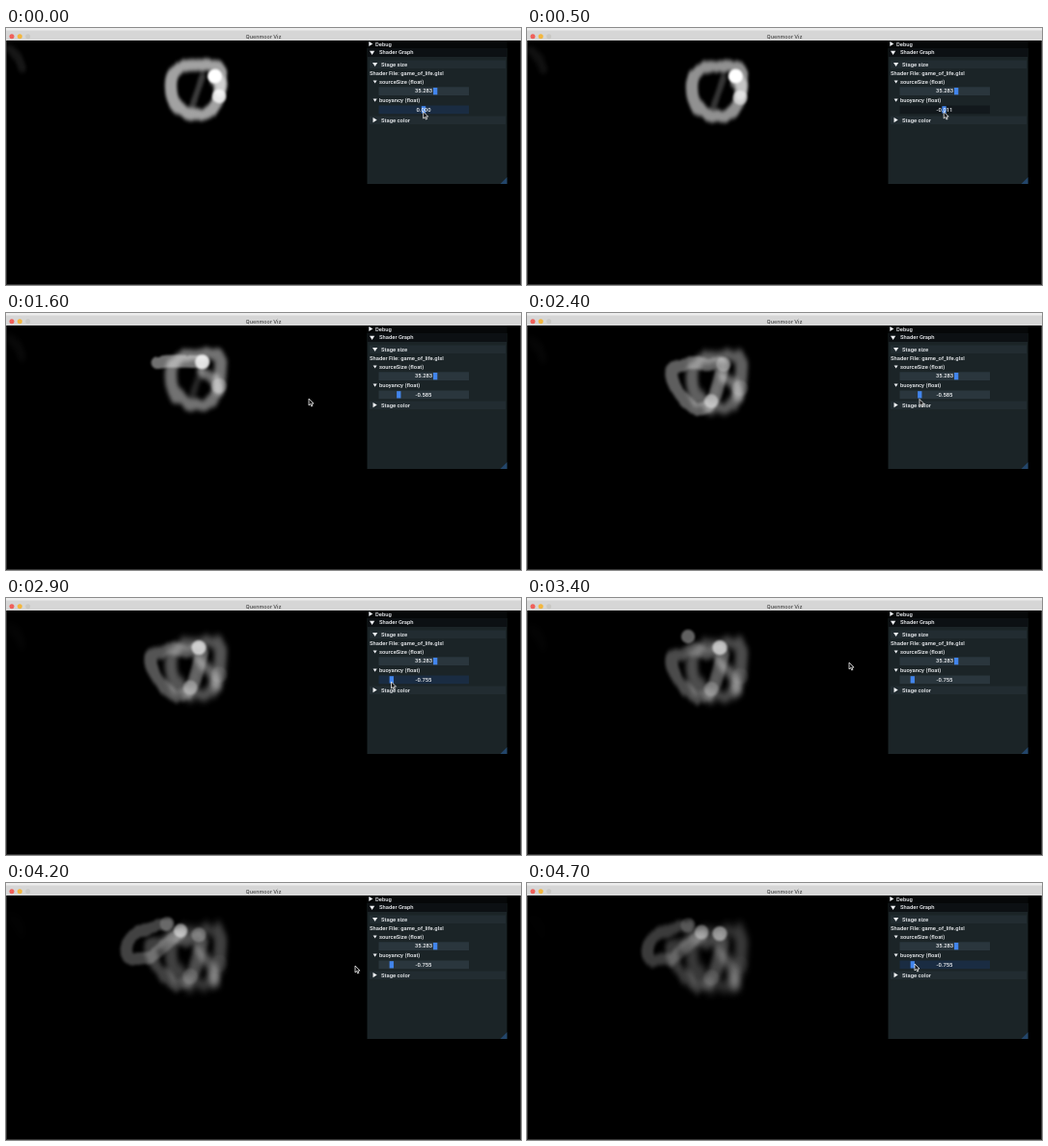
Animation, 534 px wide and 267 px high, one loop 4800 ms. Source, as an HTML page:

```html
<!DOCTYPE html>
<html lang="en">
<head>
<meta charset="utf-8">
<title>Smoke simulation</title>
<style>
  html, body { margin: 0; width: 100%; height: 100%; overflow: hidden; background: #000; }
  svg { display: block; width: 100vw; height: 100vh; }
  text { font: 500 5.85px Roboto, sans-serif; fill: #eef0f3; }
  .title { font: 500 5.4px Inter, sans-serif; fill: #444; }
  .mid { text-anchor: middle; }
</style>
</head>
<body>
<svg id="stage" viewBox="0 0 534 267">
  <rect width="534" height="267"/>
  <g id="smoke" fill="none" stroke-linecap="round" stroke-linejoin="round"></g>

  <path d="M.4 13V266.6H533.6V13" fill="none" stroke="#555" stroke-width=".7"/>
  <rect width="534" height="13" fill="#d6d6d6"/>
  <rect width="534" height="2.5" fill="#ededed"/>
  <circle cx="6" cy="8.8" r="2.5" fill="#f0605a"/>
  <circle cx="14.3" cy="8.8" r="2.5" fill="#f3b73e"/>
  <circle cx="22.7" cy="8.8" r="2.5" fill="#c9c8c4"/>
  <text class="title mid" x="267" y="10.8">Quenmoor Viz</text>

  <rect x="374.5" y="13" width="145" height="8" fill="#060809"/>
  <rect x="374.5" y="21" width="145" height="141" fill="#1b2427"/>
  <rect x="374.5" y="21" width="145" height="9" fill="#0c1013"/>
  <rect x="377" y="33.5" width="141" height="8.5" fill="#222c31"/>
  <rect x="377" y="91.5" width="141" height="8.5" fill="#222c31"/>
  <rect x="386.5" y="61.3" width="93.5" height="8.7" fill="#2a363d"/>
  <rect id="field" x="386.5" y="80.5" width="93.5" height="8.7"/>
  <rect x="443" y="62" width="4.3" height="7.3" fill="#4285ec"/>
  <rect id="grab" y="81.2" width="4.3" height="7.3" fill="#4285ec"/>
  <path d="M519.5 155V162H512.5Z" fill="#23466b"/>
  <g id="arrows" fill="#eef0f3"></g>
  <text x="383" y="18.5">Debug</text>
  <text x="387" y="27.4">Shader Graph</text>
  <text x="389" y="40">Stage size</text>
  <text x="377" y="49.4">Shader File: game_of_life.glsl</text>
  <text x="387" y="57.8">sourceSize (float)</text>
  <text class="mid" x="433" y="67.4">35.283</text>
  <text x="387" y="77">buoyancy (float)</text>
  <text id="value" class="mid" x="433" y="86.7"></text>
  <text x="389" y="97.9">Stage color</text>
  <path id="cursor" d="M0 0V7L1.6 5.5L2.7 8L3.9 7.5L2.8 5.1H5Z" fill="#111" stroke="#fff" stroke-width=".75"/>
</svg>
<script>
const LOOP = 4800, STEP = 100;
const NS = 'http://www.w3.org/2000/svg';
const byId = id => document.getElementById(id);
const set = (el, attrs) => { for (const k in attrs) el.setAttribute(k, attrs[k]); };
const ramp = (t, from, to) => Math.min(1, Math.max(0, (t - from) / (to - from)));

function add(parent, tag, attrs) {
  const el = document.createElementNS(NS, tag);
  set(el, attrs);
  return parent.appendChild(el);
}

function arrow(x, y, size, open) {
  const d = open ? 'M-1 -.8H1L0 .8Z' : 'M-.8 -1V1L.8 0Z';
  add(byId('arrows'), 'path', { d, transform: `translate(${x} ${y}) scale(${size})` });
}
arrow(378.3, 16.5, 2.5);
arrow(379.6, 25.8, 2.6, true);
arrow(382.6, 38, 2.6, true);
arrow(382.6, 56, 2, true);
arrow(382.6, 75.1, 2, true);
arrow(382.6, 95.6, 2.6);

// Catmull-Rom spline through evenly timed points.
function spline(points, u) {
  const s = u * (points.length - 1);
  const i = Math.min(Math.floor(s), points.length - 2), f = s - i;
  const p = k => points[Math.min(points.length - 1, Math.max(0, k))];
  return [0, 1].map(c => {
    const [a, b, d, e] = [i - 1, i, i + 1, i + 2].map(k => p(k)[c]);
    return b + f / 2 * (d - a + f * (2 * a - 5 * b + 4 * d - e + f * (3 * (b - d) + e - a)));
  });
}

// The slider is dragged twice; between drags the pointer leaves to stir the smoke.
const buoyancy = t => -.585 * ramp(t, 300, 1200) ** 2.63 - .17 * ramp(t, 2600, 2800);
const grabX = t => 433 + 44 * buoyancy(t);
const isDragging = t => (t >= 300 && t < 1400) || (t >= 2700 && t < 2900);
const strokes = [
  { from: 1400, to: 2400, points: [[407, 87], [314, 89], [302, 121], [340, 175], [382, 169], [407, 89.5]] },
  { from: 3200, to: 4400, points: [[400, 87], [334, 67], [260, 94], [254, 137], [300, 135], [362, 86], [402, 84]] }
];
const strokeAt = t => strokes.find(s => t > s.from && t <= s.to);

function pointer(t) {
  const s = strokeAt(t);
  if (s) return spline(s.points, ramp(t, s.from, s.to));
  return t > strokes[1].to ? [402, 84] : [grabX(t) - .3, 87];
}

// The emitter sits at half the pointer's offset in the view.
function emitter(t) {
  const [x, y] = pointer(t);
  return [x / 2, 13 + (y - 13) / 2];
}

function trail(from, to) {
  return t => {
    const points = [];
    for (let s = from; s <= Math.min(t, to); s += STEP / 2) points.push(emitter(s));
    return 'M' + points.join('L');
  };
}

// Heat of the spot under the slider: builds while the pointer rests there.
function heat(t) {
  let h = 1;
  for (let s = STEP; s <= t; s += STEP) h = strokeAt(s) ? h * .92 : h + (1 - h) * .15;
  return h;
}

function spot(t) {
  return [grabX(t) / 2, 50 + 6 * (1 - heat(t))];
}

function smear(t) {
  const [x, y] = spot(t), s = t / 1000;
  return `M${x} ${y}Q${x + 12} ${y + 3} ${222 - 1.2 * s} ${62 + 6 * s}`;
}

const smoke = byId('smoke');

// A streak of smoke fades, sinks and frays into vertical wisps as it ages.
function plume({ shape, width, density, born, life = 4.5 }) {
  const n = smoke.children.length, id = 'plume' + n;
  const f = add(smoke, 'filter', {
    id, filterUnits: 'userSpaceOnUse', x: 0, y: 0, width: 300, height: 180,
    'color-interpolation-filters': 'sRGB'
  });
  add(f, 'feTurbulence', { type: 'fractalNoise', baseFrequency: '.09 .015', numOctaves: 2, seed: n + 3 });
  add(f, 'feColorMatrix', { values: '0 0 0 0 .5  0 1 0 0 0  0 0 1 0 0  0 0 0 0 1', result: 'noise' });
  const warp = add(f, 'feDisplacementMap', { in: 'SourceGraphic', in2: 'noise', xChannelSelector: 'R', yChannelSelector: 'G' });
  const blur = add(f, 'feGaussianBlur', {});
  const path = add(smoke, 'path', { stroke: '#fff', 'stroke-width': width, filter: `url(#${id})` });
  return t => {
    const age = Math.max(0, t - born) / 1000;
    set(path, {
      d: typeof shape === 'string' ? shape : shape(Math.max(t, born)),
      opacity: t < born ? 0 : density * Math.exp(-age / life),
      transform: `translate(0 ${3 * age})`
    });
    set(warp, { scale: 1 + 5 * age });
    set(blur, { stdDeviation: `${1.2 + .3 * age} ${1.2 + .6 * age}` });
  };
}

// A round deposit left where the emitter paused.
function puff(place, density, born) {
  const circle = add(smoke, 'circle', { fill: '#fff', filter: 'url(#soft)' });
  return t => {
    const age = Math.max(0, t - born) / 1000;
    set(circle, {
      cx: place[0], cy: place[1] + 3 * age, r: 7.2 + .4 * age,
      opacity: t < born ? 0 : density * Math.exp(-age / 1.3)
    });
  };
}

function glow() {
  const circle = add(smoke, 'circle', { r: 7.6, fill: '#fff', filter: 'url(#soft)' });
  return t => {
    const [cx, cy] = spot(t);
    set(circle, { cx, cy, opacity: heat(t) ** 1.5 });
  };
}

const soft = add(smoke, 'filter', { id: 'soft', x: '-50%', y: '-50%', width: '200%', height: '200%' });
add(soft, 'feGaussianBlur', { stdDeviation: 1.2 });

const ring = 'M221 67C218 78 210 86 197 86C180 86 171 74 171 58C170 42 178 35 195 35C206 35 220 35 223 42Z';
const parts = [
  plume({ shape: 'M4 16Q14 24 17 37', width: 8, density: .3, born: -2000, life: 1.6 }),
  plume({ shape: ring, width: 12.5, density: .83, born: -1200 }),
  plume({ shape: 'M204 46L193 78', width: 6, density: .3, born: -1200 }),
  plume({ shape: trail(1400, 2400), width: 13, density: .46, born: 1400 }),
  plume({ shape: trail(3400, 4200), width: 12.5, density: .31, born: 3400 }),
  plume({ shape: smear, width: 11, density: .55, born: -1200, life: 12 }),
  puff([221, 71], .75, 0),
  puff(emitter(2200), .5, 2200),
  puff(emitter(3400), .38, 3400),
  puff(emitter(4200), .5, 4200),
  glow()
];

const field = byId('field'), grab = byId('grab'), value = byId('value'), cursor = byId('cursor');

function fieldColor(t, [x, y]) {
  if (isDragging(t)) return '#12181c';
  const hovered = x > 386 && y > 80 && y < 89;
  return hovered ? '#1a2c42' : '#2a363d';
}

function render(time) {
  const t = Math.floor(time % LOOP / STEP) * STEP;
  const tip = pointer(t);
  set(field, { fill: fieldColor(t, tip) });
  set(grab, { x: grabX(t) - 2.15 });
  value.textContent = (buoyancy(t) || 0).toFixed(3);
  set(cursor, { transform: `translate(${tip})` });
  parts.forEach(draw => draw(t));
}

const start = performance.now();
function tick() {
  render(performance.now() - start);
  requestAnimationFrame(tick);
}
tick();
</script>
</body>
</html>
```
